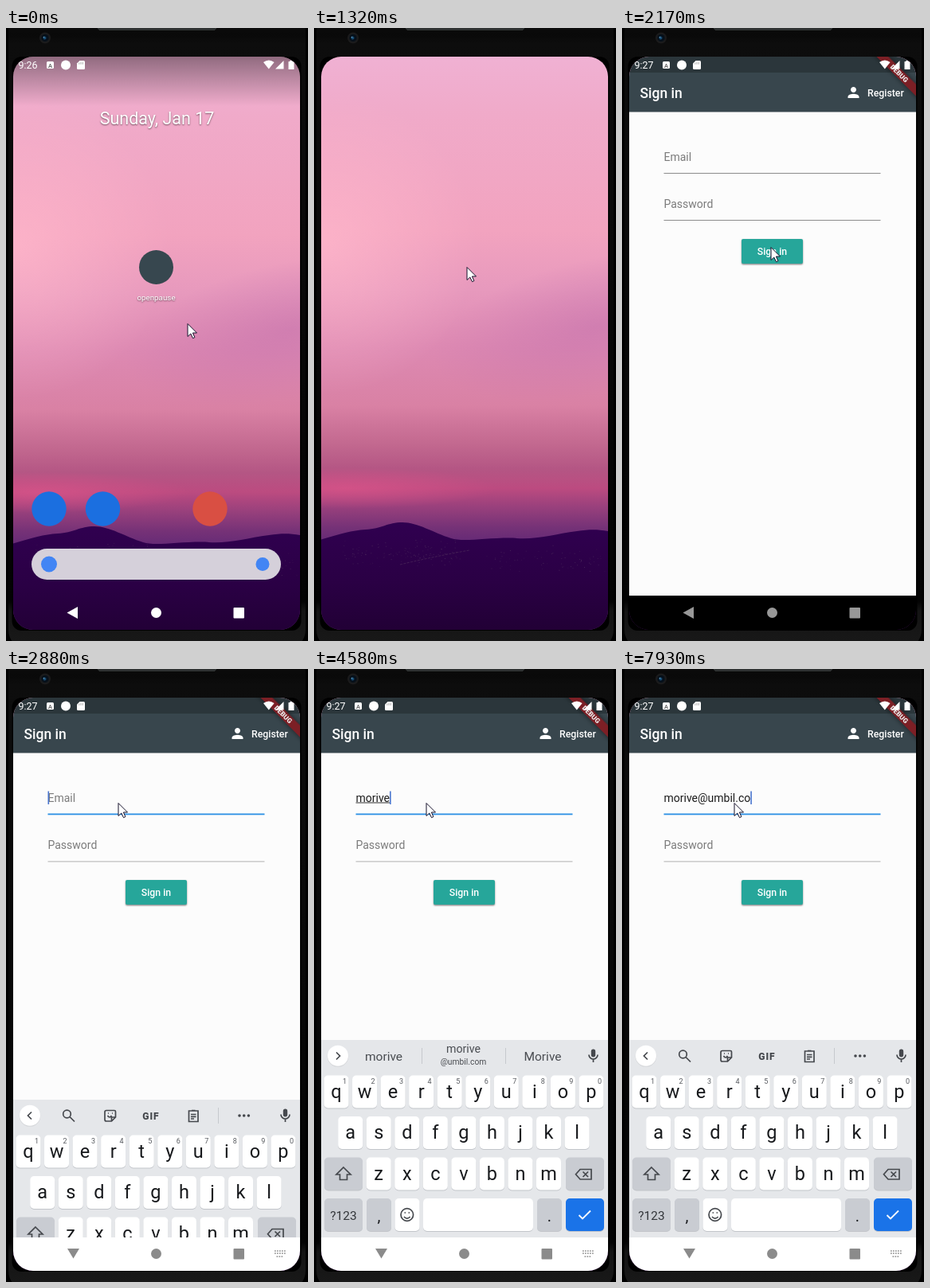
Recreate the animation shown at these times as an HTML page. Size 379 px wide and 770 px high, loop 8000 ms.

```html
<!DOCTYPE html>
<html lang="en">
<head>
<meta charset="utf-8">
<title>Sign in on a phone</title>
<style>
html, body { margin: 0; width: 100%; height: 100%; overflow: hidden; background: #000; }
svg { display: block; width: 379px; height: 770px; font-family: Roboto, Arial, sans-serif; }
.mid { text-anchor: middle; }
.bold { font-weight: 500; }
.line { fill: none; stroke: #45484d; stroke-width: 1.7; }
.soft { text-shadow: 0 1px 2px #0008; }
</style>
</head>
<body>
<svg viewBox="0 0 379 770" xmlns="http://www.w3.org/2000/svg">
<defs>
  <linearGradient id="body" x2="0" y2="1">
    <stop offset="0" stop-color="#111"/><stop offset=".035" stop-color="#090909"/>
    <stop offset=".05" stop-color="#0d0d0d"/><stop offset=".925" stop-color="#030303"/>
    <stop offset=".94" stop-color="#141414"/><stop offset="1" stop-color="#191919"/>
  </linearGradient>
  <linearGradient id="sky" gradientUnits="userSpaceOnUse" x1="0" y1="36" x2="0" y2="645">
    <stop offset="0" stop-color="#f0b1d3"/><stop offset=".12" stop-color="#f0aac9"/>
    <stop offset=".36" stop-color="#f2a3bf"/><stop offset=".48" stop-color="#e799bd"/>
    <stop offset=".6" stop-color="#dd89b2"/><stop offset=".72" stop-color="#d981a4"/>
    <stop offset=".8" stop-color="#c2688f"/><stop offset=".85" stop-color="#b45684"/>
    <stop offset=".89" stop-color="#bc4b80"/><stop offset=".93" stop-color="#98407c"/>
    <stop offset=".97" stop-color="#763277"/><stop offset="1" stop-color="#652a76"/>
  </linearGradient>
  <radialGradient id="glow"><stop offset="0" stop-color="#ffb7cb" stop-opacity=".75"/><stop offset="1" stop-color="#ffb7cb" stop-opacity="0"/></radialGradient>
  <radialGradient id="haze"><stop offset="0" stop-color="#c673ad" stop-opacity=".6"/><stop offset="1" stop-color="#c673ad" stop-opacity="0"/></radialGradient>
  <radialGradient id="rose"><stop offset="0" stop-color="#d95489" stop-opacity=".75"/><stop offset="1" stop-color="#d95489" stop-opacity="0"/></radialGradient>
  <linearGradient id="hill" x2="0" y2="1"><stop offset="0" stop-color="#300050"/><stop offset=".45" stop-color="#2a0044"/><stop offset="1" stop-color="#1d002d"/></linearGradient>
  <linearGradient id="shade" x2="0" y2="1"><stop offset="0" stop-color="#000" stop-opacity=".4"/><stop offset="1" stop-color="#000" stop-opacity="0"/></linearGradient>
  <clipPath id="screen"><rect x="9" y="36" width="360" height="720" rx="25"/></clipPath>
  <clipPath id="win"><rect id="winBox" x="9" y="36" width="360" height="720"/></clipPath>
</defs>

<rect width="379" height="770" fill="#000"/>
<rect x="3" y="-20" width="373" height="800" rx="24" fill="url(#body)"/>
<rect x="7.5" y="36" width="363" height="721" rx="12" fill="#000"/>
<path d="M115 0H264L262 2.5H117Z" fill="#2a2d2e" stroke="#454849" stroke-width=".6"/>
<circle cx="49" cy="12.5" r="7" fill="#1b1b1c"/><circle cx="49" cy="12.5" r="4.6" fill="#06101a"/>
<circle cx="48.5" cy="12.5" r="2" fill="#174a70"/><circle cx="47.5" cy="11.5" r=".8" fill="#6fa3c8"/>

<g clip-path="url(#screen)">
  <g id="wall">
    <rect x="9" y="20" width="360" height="760" fill="url(#sky)"/>
    <ellipse cx="15" cy="270" rx="190" ry="190" fill="url(#glow)"/>
    <ellipse cx="355" cy="375" rx="210" ry="85" fill="url(#haze)" transform="rotate(-12 355 375)"/>
    <ellipse cx="40" cy="578" rx="190" ry="26" fill="url(#rose)"/>
    <path fill="url(#hill)" d="M0 645C30 637 45 631 65 630S92 621 111 621S150 634 172 641C188 646 215 640 250 640.5C275 644 300 636 330 632C350 629 360 630 380 634V790H0Z"/>
    <path d="M108 674Q150 664 195 656" stroke="#4a2858" stroke-width=".8" stroke-dasharray="3 1.5" fill="none"/>
    <g id="specks" fill="#573763"></g>
  </g>

  <g id="home">
    <rect x="9" y="36" width="360" height="62" fill="url(#shade)"/>
    <text class="mid soft" x="189.5" y="121" font-size="21.5" fill="#fff">Sunday, Jan 17</text>
    <circle cx="188.5" cy="300.5" r="21.5" fill="#37474f"/>
    <circle id="press" cx="189" cy="298" r="17" fill="#000" opacity="0"/>
    <text class="mid soft" x="188.5" y="342" font-size="9.8" fill="#fff">openpause</text>
    <circle cx="54" cy="604" r="21.7" fill="#1b6fe0"/>
    <circle cx="121.500" cy="604" r="21.7" fill="#1b6fe0"/>
    <circle cx="256" cy="604" r="21.7" fill="#d94f43"/>
    <rect x="32" y="654" width="313" height="39" rx="19.5" fill="#d5d0da"/>
    <circle cx="54" cy="673.5" r="10" fill="#4285f4"/>
    <circle cx="322" cy="673.5" r="8.500" fill="#4285f4"/>
  </g>

  <g id="app" clip-path="url(#win)"><g id="page">
    <rect x="9" y="36" width="360" height="677" fill="#fcfcfc"/>
    <rect x="9" y="36" width="360" height="20.500" fill="#2b363b"/>
    <rect x="9" y="56" width="360" height="49.500" fill="#38464d"/>
    <rect x="9" y="713" width="360" height="60" fill="#000"/>
    <text class="bold" x="22.500" y="87.500" font-size="17.500" fill="#fff">Sign in</text>
    <path transform="translate(280 70.500) scale(.876)" fill="#fff" d="M12 12c2.2 0 4-1.800 4-4s-1.800-4-4-4-4 1.800-4 4 1.800 4 4 4zm0 2c-2.700 0-8 1.300-8 4v2h16v-2c0-2.700-5.300-4-8-4z"/>
    <text class="bold" x="308" y="85.500" font-size="12.300" fill="#fff">Register</text>
    <g font-size="14" fill="#7b7b7b"><text id="hint" x="52.500" y="166.500">Email</text><text x="52.500" y="226">Password</text></g>
    <rect id="rule1" x="52.500" y="182" width="272" height="1"/>
    <rect id="rule2" x="52.500" y="241" width="272" height="1"/>
    <text id="typed" x="52.500" y="166.500" font-size="14" fill="#1c1c1c"></text>
    <rect id="under" x="52.500" y="167.500" height="1" fill="#333"/>
    <rect id="caret" y="153.500" width="1.600" height="16.500" fill="#4a76cf"/>
    <rect x="150" y="266" width="77" height="31.500" rx="2" fill="#0002"/>
    <rect x="150" y="265" width="77" height="31" rx="2" fill="#26a69a" style="filter:drop-shadow(0 1px 1px #0006)"/>
    <text class="mid bold" x="188.500" y="285" font-size="12.300" fill="#fff">Sign in</text>
    <g transform="translate(369 36) rotate(45)">
      <rect x="-60" y="24.500" width="120" height="10.500" fill="#7c1f25" style="filter:drop-shadow(0 0 3px #0008)"/>
      <text class="mid" y="32.800" font-size="8.600" font-weight="900" fill="#eee">DEBUG</text>
    </g>
  </g></g>

  <g id="keys">
    <rect x="9" y="466" width="360" height="249" fill="#e5e7ea"/>
    <circle cx="30" cy="486.500" r="13.300" fill="#0001"/><circle cx="30" cy="485.700" r="13" fill="#fff"/>
    <path id="chevron" class="line"/>
    <g class="line"><rect x="347.800" y="477.500" width="5.400" height="10" rx="2.700" fill="#45484d" stroke="none"/><path d="M345 484.500a5.500 5.500 0 0 0 11 0M350.500 490v4"/></g>
    <g id="tools">
      <g class="line">
        <circle cx="76.500" cy="484" r="4.800"/><path d="M80 487.500L86 493.500"/>
        <path d="M126 479.500h10q1.500 0 1.500 1.500v7l-5 5h-6.500q-2 0-2-2v-9.500q0-2 2-2M132.500 493v-5h5M127.500 486q2.500 4 5 0M128 483h1M133 483h1"/>
        <path d="M229.500 480h11.500v13.500h-11.500zM232 484.500h6.500M232 487.300h6.500M232 490h4M233 479.500h4.500"/>
      </g>
      <text class="mid" x="182" y="490.500" font-size="12" font-weight="800" fill="#45484d" letter-spacing="1">GIF</text>
      <path d="M266.500 476v20" stroke="#c6c9cd"/>
      <g fill="#45484d"><circle cx="293" cy="486" r="1.800"/><circle cx="298.700" cy="486" r="1.800"/><circle cx="304.400" cy="486" r="1.800"/></g>
    </g>
    <g id="words" fill="#4a4d52">
      <path d="M135.500 476v20M240.500 476v20" stroke="#c6c9cd"/>
      <text id="wordL" class="mid" x="87.500" y="492" font-size="15.500"></text>
      <text id="wordM" class="mid" x="187.500" font-size="14.200"></text>
      <text id="domain" class="mid" x="187.500" y="496.500" font-size="10.300">@umbil.com</text>
      <text id="wordR" class="mid" x="287" y="492" font-size="15.500"></text>
    </g>
    <g id="caps"></g>
    <g class="line">
      <path d="M37 626l9 9h-4.500v6.500h-9V635H28z"/>
      <path d="M334 628.500h14v12.500h-14l-5.500-6.200zM337.500 631.500l6.500 6.500M344 631.500l-6.500 6.500"/>
      <circle cx="116.800" cy="685.500" r="7.800"/><path d="M113 688q3.800 4.300 7.600 0M113.500 683h1.600M118.500 683h1.600"/>
      <path d="M332.500 686l4.500 4.500 10-10" stroke="#fff" stroke-width="1.800"/>
    </g>
  </g>
  <rect id="tray" x="9" y="714" width="360" height="42" fill="#fff"/>
  <g id="nav">
    <path id="back"/><circle cx="188.500" cy="734.500" r="6.500"/><rect x="285.500" y="728" width="13.500" height="13.500" rx="1"/>
    <path id="board" stroke-width="1.500" stroke-dasharray="1.700 1.300" fill="none" d="M337 731h14.500M337 734h14.500M339.500 738h9"/>
  </g>
  <g id="status" fill="#fff">
    <text id="clock" x="15.500" y="51" font-size="12.500"></text>
    <rect x="51" y="42" width="9" height="9" rx="1.500"/><text class="mid bold" x="55.500" y="49.500" font-size="7.500" fill="#555">A</text>
    <circle cx="75" cy="46.500" r="6"/>
    <path d="M92.500 41h5q1.500 0 1.500 1.500v8q0 1.500-1.500 1.500h-7q-1.500 0-1.500-1.500V44.500z"/>
    <path d="M91.800 43.500v2.200M94 43v2.700M96.300 43v2.700" stroke="#7779"/>
    <path d="M323 43q6.800-5 13.600 0L329.800 51.500z"/><path d="M338 51.500L348.500 41V51.500z"/><path d="M355 42h1.500v-1.300h3V42h1.500q.5 0 .5.500v9q0 .5-.5.500h-6q-.5 0-.5-.5v-9q0-.5.500-.5z"/>
  </g>
  <path id="mouse" d="M0 .5V16.500L3.800 13 6.500 18.700 8.900 17.600 6.400 12H11.500Z" fill="#fff" stroke="#15102a" stroke-width="1"/>
</g>
</svg>
<script>
const LOOP = 8000;
const ADDRESS = "morive@umbil.co";
const $ = id => document.getElementById(id);
const set = (id, attrs) => { for (const k in attrs) $(id).setAttribute(k, attrs[k]); };
const show = (id, on) => { $(id).style.display = on ? "" : "none"; };

// Each row is [start time, value]; the value holds until the next row.
const steps = {
  mouse: [[0, [228, 371]], [70, [226, 367]], [150, [219, 352]], [230, [210, 335]], [300, [202, 319]],
    [380, [196, 307]], [460, [193, 302]], [530, [192, 300]], [2170, [187, 275]], [2240, [157, 207]],
    [2320, [136, 154]], [2490, [141, 168]]],
  home: [[0, 1], [1240, .35], [1320, 0]],
  wall: [[0, 5], [1320, 0], [1400, -7]],
  gap: [[0, 0], [1400, 1], [1480, .5], [1560, .22], [1640, .07], [1720, 0]],
  press: [[0, 0], [1000, .12], [1090, .05]],
  slide: [[0, 300], [2800, 190], [2880, 75], [2950, 18], [3030, 0]],
  count: [[0, 0], [3260, 1], [3490, 2], [3890, 3], [4190, 4], [4350, 5], [4500, 6], [5970, 7], [6680, 8],
    [6830, 9], [7000, 10], [7070, 11], [7320, 12], [7540, 13], [7700, 14], [7930, 15]],
  words: [[0, null], [3410, ["m", "me", "my"]], [4040, ["mor", "more", "For"]], [4270, ["mori", "more", "Mori"]],
    [4580, ["morive", "morive", "Morive"]], [6140, null]],
  caret: [[0, false], [2570, true], [5040, false], [5510, true], [6360, false], [6680, true]],
  hint: [[0, 1], [3260, .85], [3340, 0]]
};
const at = (name, t) => steps[name].filter(s => s[0] <= t).pop()[1];

function buildKeys() {
  let out = "";
  const cap = (x, y, w, fill) => {
    out += `<rect x="${x}" y="${y + 1}" width="${w}" height="41" rx="5" fill="#c2c5ca"/>` +
      `<rect x="${x}" y="${y}" width="${w}" height="41" rx="5" fill="${fill}"/>`;
  };
  const label = (x, y, size, text, fill = "#17191c") => {
    out += `<text class="mid" x="${x}" y="${y}" font-size="${size}" fill="${fill}">${text}</text>`;
  };
  ["qwertyuiop", "asdfghjkl", "zxcvbnm"].forEach((row, r) => {
    [...row].forEach((ch, i) => {
      const x = [28, 45.7, 81.2][r] + i * 35.55, y = 510.500 + r * 51.500;
      cap(x - 15.500, y, 31, "#fff");
      label(x, y + 28, 23.500, ch);
      if (!r) label(x + 10.500, y + 10.500, 9, (i + 1) % 10, "#55585d");
    });
  });
  const gray = "#c9ccd2";
  cap(13, 613.500, 48, gray);
  cap(316, 613.500, 48, gray);
  cap(13, 665, 48, gray);
  cap(66, 665, 31, gray);
  cap(101.500, 665, 31, "#fff");
  cap(137, 665, 138, "#fff");
  cap(280, 665, 31, gray);
  cap(316, 665, 48, "#1a73e8");
  label(37, 691.500, 15.500, "?123", "#33363a");
  label(81.500, 694, 20, ",");
  label(295.500, 694, 20, ".");
  $("caps").innerHTML = out;
}

function buildSpecks() {
  let seed = 17, out = "";
  const rnd = () => (seed = seed * 16807 % 2147483647) / 2147483647;
  for (let i = 0; i < 190; i++) {
    const right = rnd() > .65;
    const x = right ? 215 + rnd() * 150 : 35 + rnd() * 150;
    const y = (right ? 646 : 640) + (rnd() + rnd()) * 20;
    out += `<rect x="${x.toFixed(1)}" y="${y.toFixed(1)}" width="1" height=".7" opacity="${(.3 + rnd() * .6).toFixed(2)}"/>`;
  }
  $("specks").innerHTML = out;
}

function drawHome(t) {
  const home = at("home", t), gap = at("gap", t), scale = 1 - .074 * gap;
  set("wall", { transform: `translate(0 ${at("wall", t)})` });
  set("home", { opacity: home });
  set("press", { opacity: at("press", t) });
  const open = t >= 1400;
  show("app", open);
  set("winBox", { x: 9 + 13 * gap, y: 36 + 34 * gap, width: 360 - 26 * gap, height: 720 - 69 * gap, rx: gap ? 7 : 0 });
  set("page", { transform: `translate(${9 + 13 * gap} ${36 + 34 * gap}) scale(${scale}) translate(-9 -36)` });
  const bars = open ? 1 : home;
  set("status", { opacity: bars });
  set("nav", { opacity: bars });
  $("clock").textContent = t < 1000 ? "9:26" : "9:27";
}

function drawForm(t) {
  const n = at("count", t), typed = $("typed"), focus = t >= 2570;
  typed.textContent = ADDRESS.slice(0, Math.min(n, 6));
  const nameWidth = n ? typed.getComputedTextLength() : 0;
  typed.textContent = ADDRESS.slice(0, n);
  const width = n ? typed.getComputedTextLength() : 0;
  set("under", { width: nameWidth });
  show("under", n && t < 6140);
  set("caret", { x: 52.500 + width });
  show("caret", at("caret", t));
  set("hint", { opacity: at("hint", t) });
  const idle = t < 1720 ? "#c6c6c6" : "#8d8d8d", thick = t < 1720 ? 1.800 : 1;
  set("rule1", { fill: focus ? "#2b90e4" : idle, y: focus ? 181.500 : 182, height: focus ? 1.800 : thick });
  set("rule2", { fill: focus ? "#cdcdcd" : idle, height: focus ? 1.600 : thick });
}

function drawKeys(t) {
  const up = t >= 2800, words = at("words", t);
  show("keys", up);
  show("tray", up);
  set("keys", { transform: `translate(0 ${at("slide", t)})` });
  show("tools", !words);
  show("words", words);
  set("chevron", { d: words ? "M28 481.500l4.500 4.500-4.500 4.500" : "M32 481.500l-4.500 4.500 4.500 4.500" });
  if (words) {
    ["wordL", "wordM", "wordR"].forEach((id, i) => { $(id).textContent = words[i]; });
    set("wordM", { y: t >= 4580 ? 482 : 492 });
    show("domain", t >= 4580);
  }
  const tint = t < 1860 ? "#fff" : up ? "#8b8b8b" : "#989898";
  set("nav", { fill: tint });
  set("board", { stroke: tint });
  show("board", t >= 2650);
  set("back", { d: t >= 2650 ? "M77 728H92L84.500 740.500Z" : "M76.500 734.500L90 727V742Z" });
}

function frame() {
  const t = performance.now() % LOOP;
  drawHome(t);
  drawForm(t);
  drawKeys(t);
  set("mouse", { transform: `translate(${at("mouse", t)})` });
  requestAnimationFrame(frame);
}

buildKeys();
buildSpecks();
frame();
</script>
</body>
</html>
```
